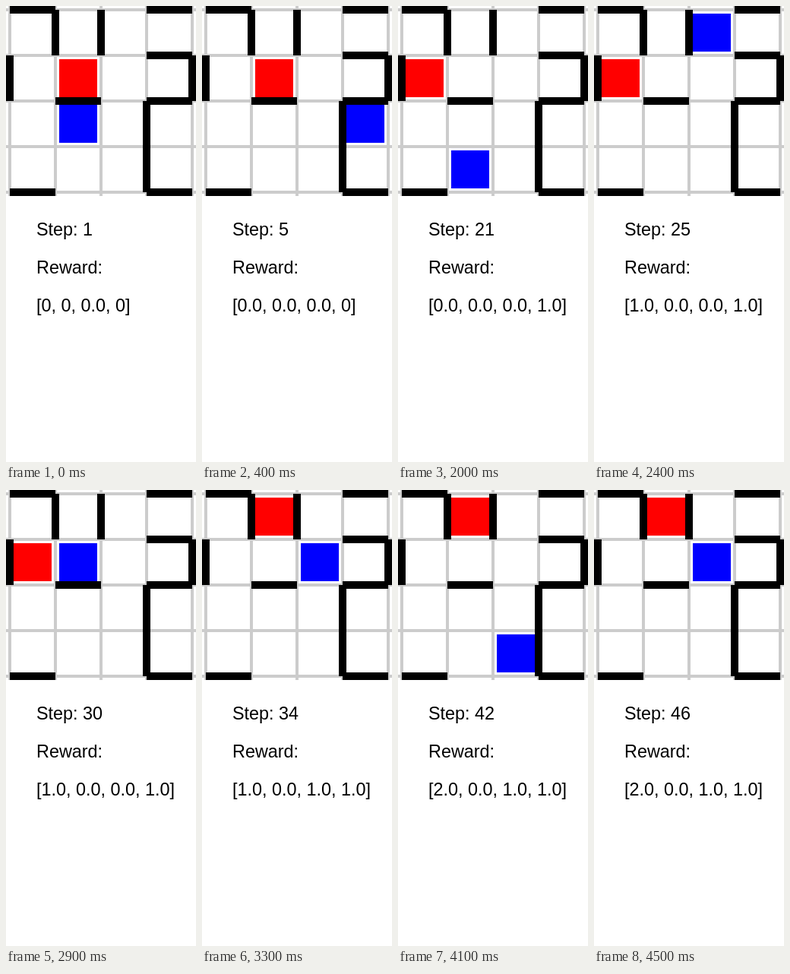
Recreate the animation shown at these times as an HTML page. Size 250x600 px, loop 4600 ms.

```html
<!DOCTYPE html>
<html lang="en">
<head>
<meta charset="utf-8">
<title>Grid walk</title>
<style>
html, body { margin: 0; width: 100%; height: 100%; overflow: hidden; background: #fff; }
svg { display: block; }
text { font: 23.4px "Liberation Sans", Arial, sans-serif; font-kerning: none; white-space: pre; }
</style>
</head>
<body>
<svg width="250" height="600" viewBox="0 0 250 600">
  <path stroke="#ccc" stroke-width="4" d="M0 5H250M0 65H250M0 125H250M0 185H250M0 245H250
    M5 0V250M65 0V250M125 0V250M185 0V250M245 0V250"/>
  <path stroke="#000" stroke-width="10" d="M5 5H65M185 5H245M65 5V65M125 5V65M185 65H245M5 65V125
    M245 65V125M65 125H125M185 125H245M185 125V245M5 245H65M185 245H245"/>
  <rect id="goal" width="50" height="50" fill="#f00"/>
  <rect id="agent" width="50" height="50" fill="#00f"/>
  <text id="count" x="40" y="302"></text>
  <text x="40" y="352">Reward:</text>
  <text id="reward" x="40" y="402"></text>
</svg>
<script>
const STEP_MS = 100;
const $ = id => document.getElementById(id);

// Column and row of the agent at each step
const path = (
  '12 02 03 02 32 32 32 32 32 33 33 33 33 ' +
  '03 02 01 11 22 23 23 13 03 02 01 ' +
  '20 20 21 21 21 11 01 ' +
  '22 22 21 21 11 11 10 ' +
  '22 22 23 23 20 20 20 21').split(' ');

// [first step, value]
const goals = [[1, '11'], [18, '01'], [32, '10']];
const rewards = [
  [1, '0, 0, 0.0, 0'],
  [3, '0, 0.0, 0.0, 0'],
  [4, '0.0, 0.0, 0.0, 0'],
  [17, '0.0, 0.0, 0.0, 1.0'],
  [24, '1.0, 0.0, 0.0, 1.0'],
  [31, '1.0, 0.0, 1.0, 1.0'],
  [38, '2.0, 0.0, 1.0, 1.0'],
];

const latest = (list, step) => list.filter(([from]) => from <= step).pop()[1];

function place(id, [col, row]) {
  $(id).setAttribute('x', 10 + 60 * col);
  $(id).setAttribute('y', 10 + 60 * row);
}

function draw() {
  const step = Math.floor(performance.now() / STEP_MS) % path.length + 1;
  place('agent', path[step - 1]);
  place('goal', latest(goals, step));
  $('count').textContent = `Step: ${step}`;
  $('reward').textContent = `[${latest(rewards, step)}]`;
  requestAnimationFrame(draw);
}
draw();
</script>
</body>
</html>
```
